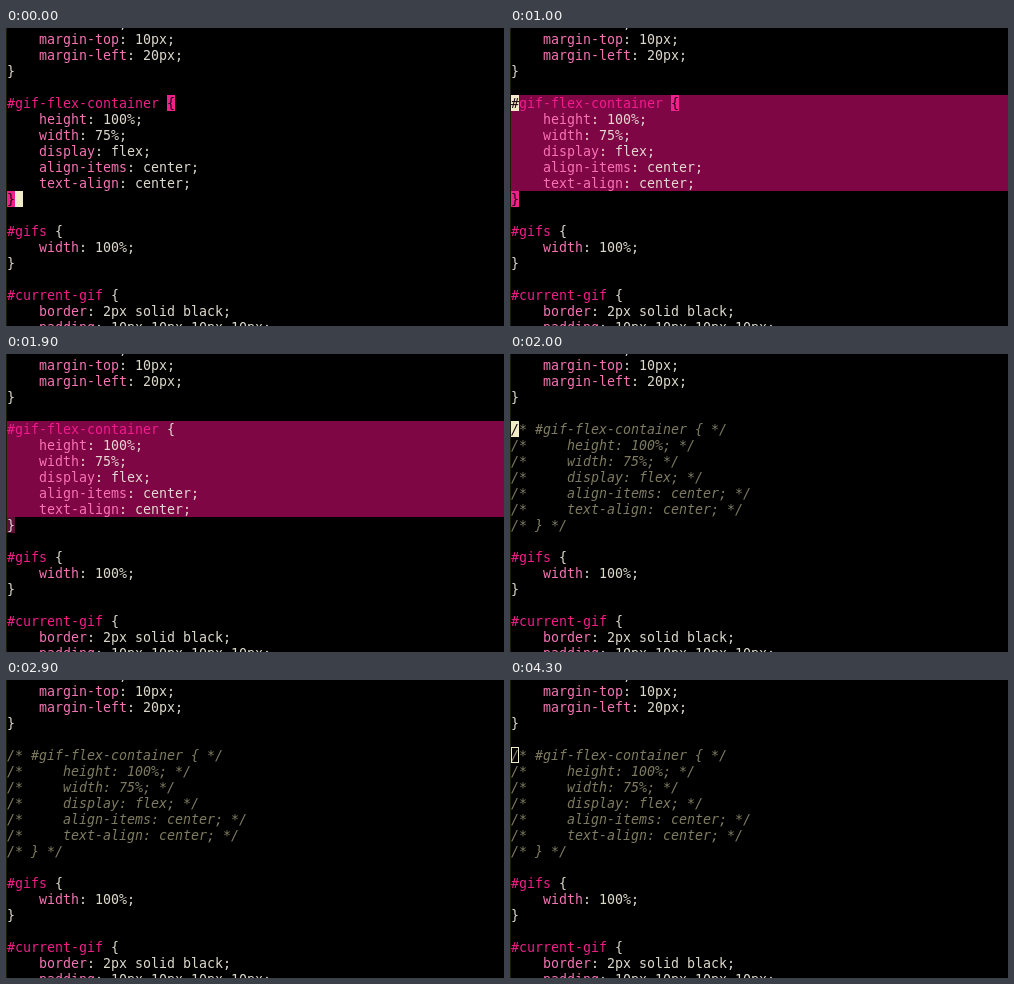
Animation, 498 px wide and 298 px high, one loop 4.4 s. Source, as an HTML page with a canvas:

```html
<!DOCTYPE html>
<html lang="en">
<head>
<meta charset="utf-8">
<title>Commenting out a CSS rule</title>
<style>
html, body { margin: 0; width: 100%; height: 100%; overflow: hidden; background: #000; }
canvas { display: block; }
</style>
</head>
<body>
<canvas id="stage" width="498" height="298"></canvas>
<script>
const ctx = document.getElementById('stage').getContext('2d');
const LOOP = 4400, CELL = 8, LINE = 16, BASE = 13, LEFT = 1, TOP = 3;
const FONT = '13.29px "DejaVu Sans Mono", monospace';
const FIRST = 4, LAST = 10; // rows of the rule being commented out

const PLAIN = { text: '#dcd8cc', selector: '#ee1e86', property: '#f274b2' };
const MARKED = { text: '#e6d6d2', selector: '#f01c8e', property: '#fa72b6' };
const COMMENT = '#7f7b62', CURSOR = '#f0ecc8', MATCH = '#f0208c', REGION = '#7e0644';

// The first line is scrolled almost out of view.
const lines = `    width: 25%;
    margin-top: 10px;
    margin-left: 20px;
}

#gif-flex-container {
    height: 100%;
    width: 75%;
    display: flex;
    align-items: center;
    text-align: center;
}

#gifs {
    width: 100%;
}

#current-gif {
    border: 2px solid black;
    padding: 10px 10px 10px 10px;`.split('\n');

const colX = col => LEFT + col * CELL;
const rowY = row => TOP + row * LINE;

function box(col, row, color) {
  ctx.fillStyle = color;
  ctx.fillRect(colX(col), rowY(row), CELL, LINE);
}

function write(str, col, row, color) {
  ctx.fillStyle = color;
  [...str].forEach((ch, i) => ctx.fillText(ch, colX(col + i), rowY(row) + BASE));
}

function writeCss(line, row, colors) {
  const [, indent, name, rest] = line.match(/^( *)(#?[\w-]*)(.*)$/);
  const nameColor = name[0] === '#' ? colors.selector : colors.property;
  write(name, indent.length, row, nameColor);
  write(rest, indent.length + name.length, row, colors.text);
}

// A filled cell with the character redrawn in dark on top.
function invert(col, row, ch, color) {
  box(col, row, color);
  write(ch, col, row, '#180810');
}

function draw(t) {
  const selected = t >= 1000 && t < 2000;
  const commented = t >= 2000;
  const unfocused = t >= 3800;
  const cursorOn = t % 1000 < 500;

  ctx.fillStyle = '#000';
  ctx.fillRect(0, 0, 498, 298);
  ctx.fillStyle = '#1c1c08';
  ctx.fillRect(0, 0, 1, 298);

  if (selected) {
    ctx.fillStyle = REGION;
    ctx.fillRect(LEFT, rowY(FIRST), 498 - LEFT, (LAST - FIRST) * LINE);
    box(0, LAST, '#5c1038');
  }

  lines.forEach((line, i) => {
    const row = i - 1;
    const inRule = row >= FIRST && row <= LAST;
    ctx.font = (commented && inRule ? 'italic ' : '') + FONT;
    if (commented && inRule) write(`/* ${line} */`, 0, row, COMMENT);
    else writeCss(line, row, selected && inRule ? MARKED : PLAIN);
  });

  ctx.font = FONT;
  if (t < 1100) {
    invert(20, FIRST, '{', MATCH);
    invert(0, LAST, '}', MATCH);
  }

  if (unfocused) {
    ctx.strokeStyle = CURSOR;
    ctx.strokeRect(LEFT + 0.5, rowY(FIRST) + 0.5, CELL - 1, LINE - 1);
  } else if (cursorOn) {
    if (commented) ctx.font = 'italic ' + FONT;
    if (t < 1000) box(1, LAST, CURSOR);
    else invert(0, FIRST, commented ? '/' : '#', CURSOR);
  }
}

const start = performance.now();
function tick() {
  draw((performance.now() - start) % LOOP);
  requestAnimationFrame(tick);
}
tick();
</script>
</body>
</html>
```
